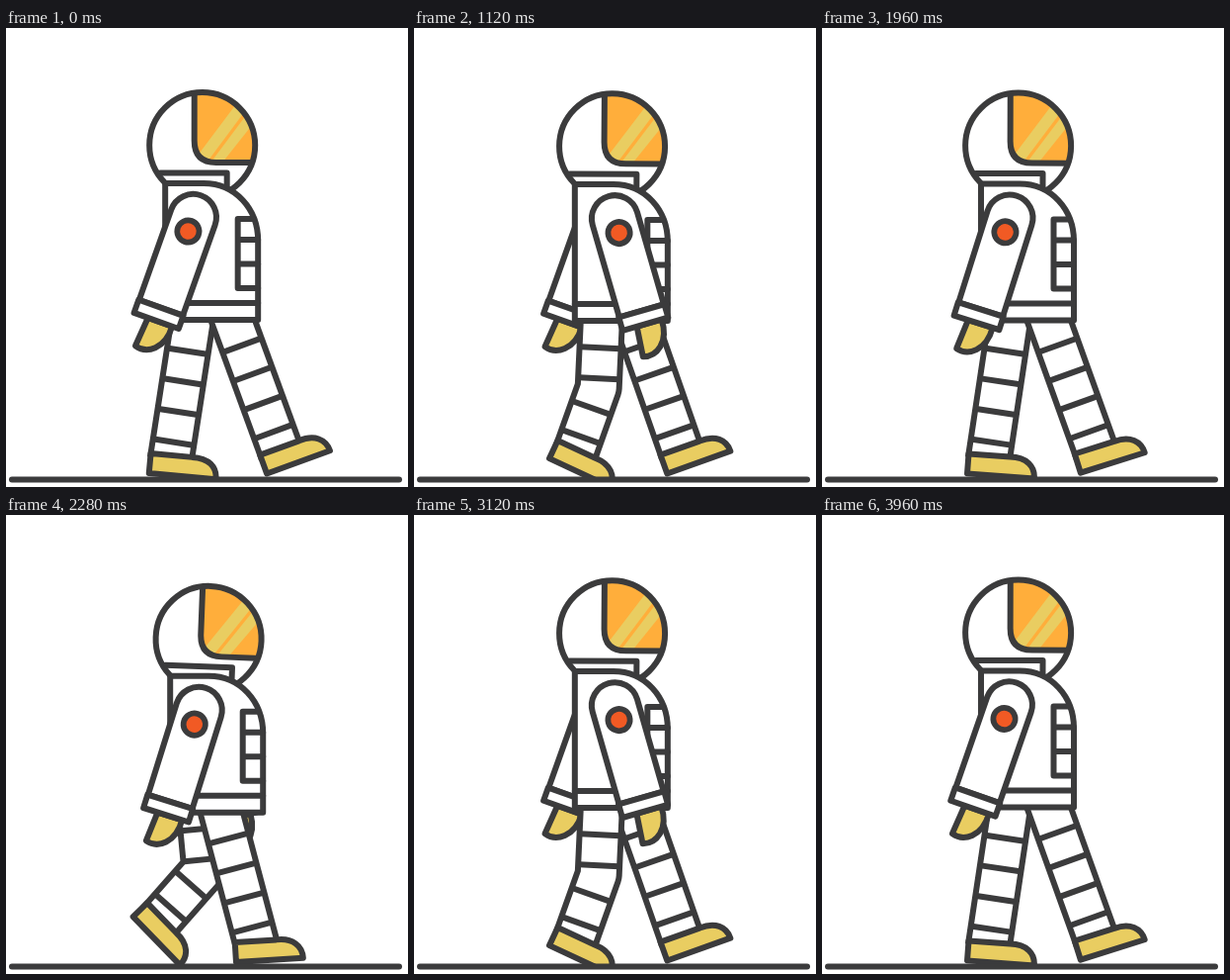
Write an HTML page with a canvas that moves like this. It is 407 by 464 pixels and loops after 4000 ms.

```html
<!DOCTYPE html>
<html lang="en">
<head>
<meta charset="utf-8">
<title>Walking astronaut</title>
<style>
  html, body { margin: 0; width: 100%; height: 100%; overflow: hidden; background: #fff; }
  canvas { display: block; width: 407px; height: 464px; }
</style>
</head>
<body>
<canvas id="stage"></canvas>
<script>
const W = 407, H = 464, GROUND = 456.5;
const LOOP = 4000, STRIDE = 2000, STEP = 1000;
const INK = '#3b3b3c', WHITE = '#fff', YELLOW = '#e9cd61', ORANGE = '#ffae3b', RED = '#f15a24';
const THIGH = 72, SHIN = 66, REACH = THIGH + SHIN;

const canvas = document.getElementById('stage');
const ctx = canvas.getContext('2d');
const scale = window.devicePixelRatio || 1;
canvas.width = W * scale;
canvas.height = H * scale;

const { PI, sin, cos, sqrt, hypot, min, max } = Math;
const ease = u => (1 - cos(PI * u)) / 2;
const clamp = u => min(1, max(0, u));

// Foot on the ground, carried backwards under the body
function stance(u) {
  const landed = ease(clamp((u - 0.1) / 0.25));
  return {
    hip: { x: 229 - 40 * u * (1.18 - 0.18 * u), y: 293.5 },
    ankle: { x: 277 - 109.5 * (0.6 * ease(u) + 0.4 * u), y: 424.5 + 7.5 * landed },
    foot: -20 * (1 - landed) + 5 * u ** 4
  };
}

// Foot lifted and brought forward
function swing(u) {
  const lift = sin(PI * u) ** 2;
  return {
    hip: { x: 189 + 40 * ease(u) - 3 * lift, y: 293.5 - 12.5 * lift },
    ankle: { x: 167.5 + 109.5 * ease(u) - 50 * lift, y: 432 - 7.5 * u - 38 * lift },
    foot: 5 - 25 * u + 62 * sin(PI * u) * (1 - u ** 6)
  };
}

function legPose(time) {
  const t = time % STRIDE;
  return t < STEP ? stance(t / STEP) : swing(t / STEP - 1);
}

function bodyPose(time) {
  const bob = delay => ease(2 * (time - delay) / STEP);
  return { x: 7 * bob(-50), y: 11 * bob(25), tilt: 4.3 * bob(25) };
}

const armSwing = t => 18 * cos(2 * PI * t / STRIDE);
const nearArmAngle = t => 1.75 + armSwing(t - 40 - 80 * sin(PI * t / LOOP) ** 2);
const farArmAngle = t => 1.75 - armSwing(t - 90);

function shape(d, fill, width = 6) {
  const path = new Path2D(d);
  if (fill) { ctx.fillStyle = fill; ctx.fill(path); }
  ctx.strokeStyle = INK;
  ctx.lineWidth = width;
  ctx.stroke(path);
}

function placed(x, y, angle, draw) {
  ctx.save();
  ctx.translate(x, y);
  ctx.rotate(angle * PI / 180);
  draw();
  ctx.restore();
}

function disc(x, y, r, color) {
  ctx.fillStyle = color;
  ctx.beginPath();
  ctx.arc(x, y, r, 0, 2 * PI);
  ctx.fill();
}

const direction = (from, to) => {
  const length = hypot(to.x - from.x, to.y - from.y);
  return { x: (to.x - from.x) / length, y: (to.y - from.y) / length, length };
};
const moved = (p, dir, s) => ({ x: p.x + dir.x * s, y: p.y + dir.y * s });

// The knee bends forward whenever the ankle is within reach
function kneeOf(hip, ankle) {
  const dir = direction(hip, ankle), d = dir.length;
  if (d >= REACH) return moved(hip, dir, d * THIGH / REACH);
  const along = (THIGH ** 2 - SHIN ** 2 + d ** 2) / (2 * d);
  const bend = sqrt(max(0, THIGH ** 2 - along ** 2));
  return moved(moved(hip, dir, along), { x: dir.y, y: -dir.x }, bend);
}

function drawLeg(time) {
  const { hip, ankle, foot } = legPose(time);
  const knee = kneeOf(hip, ankle);
  const shin = direction(ankle, knee), thigh = direction(knee, hip);
  const top = moved(hip, thigh, 14), end = moved(ankle, shin, -5);

  const limb = new Path2D(`M${top.x} ${top.y}L${knee.x} ${knee.y}L${end.x} ${end.y}`);
  ctx.lineCap = 'butt';
  for (const [color, width] of [[INK, 48], [WHITE, 36]]) {
    ctx.strokeStyle = color;
    ctx.lineWidth = width;
    ctx.stroke(limb);
  }
  const cuff = 13.5 - min(0, foot) * 0.2;
  for (let i = 0; i < 4; i++) {
    const s = cuff + i * 31;
    const onShin = s < shin.length, dir = onShin ? shin : thigh;
    const p = onShin ? moved(ankle, dir, s) : moved(knee, dir, s - shin.length);
    shape(`M${p.x - dir.y * 20} ${p.y + dir.x * 20}L${p.x + dir.y * 20} ${p.y - dir.x * 20}`);
  }
  ctx.lineCap = 'round';
  placed(ankle.x, ankle.y, foot, () => shape('M-21 0H21C38-1 47 8 47 20H-21Z', YELLOW));
}

function drawArm(angle) {
  placed(196, 172.5, angle, () => {
    shape('M-9 131L-11.5 162C2 166 18 155 17 131Z', YELLOW);
    shape('M-23.5 117V20A23.5 23.5 0 0 1 23.5 20V117Z', WHITE);
    shape('M-24 117H24V131H-24Z', WHITE);
    disc(0, 35, 14, INK);
    disc(0, 35, 8.3, RED);
  });
}

function drawHead(tilt) {
  const visor = new Path2D('M190.5 55V114Q190.5 136 212.5 136H262V55Z');
  placed(170, 155, tilt, () => {
    ctx.translate(-170, -155);
    disc(198.5, 118.5, 53.5, WHITE);
    ctx.save();
    ctx.beginPath();
    ctx.arc(198.5, 118.5, 53.5, 0, 2 * PI);
    ctx.clip();
    ctx.save();
    ctx.clip(visor);
    ctx.fillStyle = ORANGE;
    ctx.fillRect(180, 50, 90, 90);
    ctx.fillStyle = YELLOW;
    ctx.fill(new Path2D('M187 138L232 78L241 85L200 140ZM204 140L243 88L249 98L214 142Z'));
    ctx.restore();
    shape(visor);
    ctx.restore();
    shape('M145 118.5A53.5 53.5 0 1 1 252 118.5A53.5 53.5 0 1 1 145 118.5Z');
    shape('M156 146.5H223.5V164');
  });
}

function drawTorso() {
  shape('M161 157H200C232 157 255 183 255 215V295H161Z', WHITE);
  shape('M161 278H255M250 193H234.5V263H255M234.5 214H255M234.5 238.5H255');
}

function draw(t) {
  const body = bodyPose(t);
  const onBody = part => placed(body.x, body.y, 0, part);
  ctx.setTransform(scale, 0, 0, scale, 0, 0);
  ctx.fillStyle = WHITE;
  ctx.fillRect(0, 0, W, H);
  ctx.lineCap = ctx.lineJoin = 'round';

  onBody(() => drawArm(farArmAngle(t)));
  ctx.save();
  ctx.beginPath();
  ctx.rect(0, 0, W, GROUND);
  ctx.clip();
  drawLeg(t + STEP);
  drawLeg(t);
  ctx.restore();
  onBody(() => {
    drawHead(body.tilt);
    drawTorso();
    drawArm(nearArmAngle(t));
  });
  shape(`M6 ${GROUND}H398`);
}

const start = performance.now();
function tick() {
  draw((performance.now() - start) % LOOP);
  requestAnimationFrame(tick);
}
tick();
</script>
</body>
</html>
```
